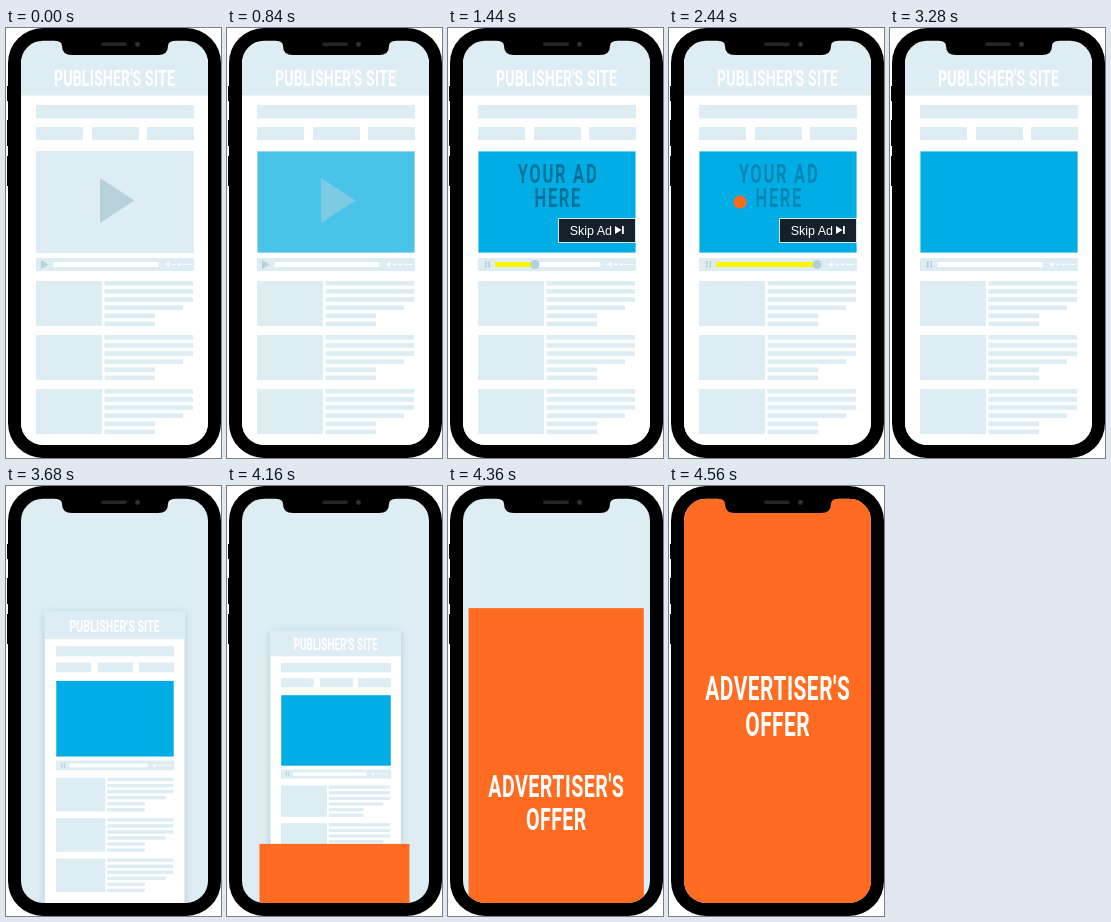
These frames come from a looping animation (215 px wide and 430 px high, 5.8 s). An HTML page:

```html
<!DOCTYPE html>
<html lang="en">
<head>
<meta charset="utf-8">
<title>Skippable video ad</title>
<style>
html, body { margin: 0; width: 100%; height: 100%; overflow: hidden; background: #fff; }
svg { display: block; width: 100%; height: 100%; }
.caps { font-family: Roboto, "Liberation Sans", sans-serif; font-weight: 700; text-anchor: middle; }
.skip { font: 12.5px "Liberation Sans", Arial, sans-serif; fill: #fff; }
</style>
</head>
<body>
<svg viewBox="0 0 215 430">
  <defs>
    <clipPath id="screen"><rect x="15" y="12.700" width="187" height="404.300" rx="22"/></clipPath>
    <filter id="blur" x="-15%" y="-15%" width="130%" height="130%"><feGaussianBlur stdDeviation="5"/></filter>
  </defs>
  <rect x="2" y="0" width="213" height="430" rx="35"/>
  <path d="M1 58h2v15h-2zM1 92h2v26h-2zM1 128h2v30h-2z"/>
  <g clip-path="url(#screen)">
    <rect x="15" y="12" width="187" height="405" fill="#deedf4"/>
    <g id="page">
      <rect id="shadow" x="15" y="33" width="187" height="392" fill="#7f9cab" opacity=".5" filter="url(#blur)"/>
      <rect x="15" y="31" width="187" height="392" fill="#fff"/>
      <g id="blocks" fill="#deedf4"></g>
      <g id="title"></g>
      <rect id="ad" x="30.500" y="123.500" width="157" height="101" fill="#00aee5"/>
      <path id="play" d="M94 150L128.500 172.500L94 195Z" fill="#b7d2db"/>
      <path id="playIcon" d="M35 232L42.500 236.500L35 241Z" fill="#b7d2db"/>
      <path id="pauseIcon" d="M37 233h1.500v7h-1.500zM40.500 233h1.500v7h-1.500z" fill="#b7cfda"/>
      <rect x="47.500" y="234" width="105" height="5" rx="1.500" fill="#fff"/>
      <path d="M159 236.500L163.500 233.500V239.500ZM166 236h4v1h-4zM172 235.500h3v2h-3zM177 236h8v1h-8z" fill="#fff" opacity=".8"/>
      <g id="overlay">
        <g id="adText"></g>
        <rect id="bar" x="47" y="234" height="5" fill="#fbf500"/>
        <circle id="knob" cy="236.500" r="4.600" fill="#b3cfda"/>
        <rect x="110.500" y="190.500" width="77" height="24" fill="#15202a" stroke="#d5e8ef"/>
        <text class="skip" x="121.700" y="206.800">Skip Ad</text>
        <path d="M167 198L173.500 202L167 206ZM174 198h1.800v8h-1.800z" fill="#fff"/>
      </g>
      <circle id="tap" cx="71" cy="174" fill="#f76a1f"/>
    </g>
    <g id="sheet">
      <rect x="15" y="13" width="187" height="530" fill="#ff6b21"/>
      <g id="offer"></g>
    </g>
  </g>
  <path d="M49 12V12.700Q56 13 56 18Q56 27 66 27H152Q162 27 162 18Q162 13 169 12.700V12Z"/>
  <rect x="95" y="14.500" width="26" height="3.500" rx="1.700" fill="#252628"/>
  <circle cx="131.500" cy="16.300" r="2.600" fill="#24262c"/>
  <circle cx="131.500" cy="16.300" r="1.100" fill="#3b414d"/>
</svg>
<script>
const LOOP = 5800, STEP = 40;
const NS = "http://www.w3.org/2000/svg";
const $ = id => document.getElementById(id);
const clamp = v => Math.max(0, Math.min(1, v));
const span = (t, a, b) => clamp((t - a) / (b - a));
const mix = (a, b, p) => a + (b - a) * p;

function add(parent, tag, attrs) {
  const el = document.createElementNS(NS, tag);
  for (const k in attrs) el.setAttribute(k, attrs[k]);
  return parent.appendChild(el);
}
function set(id, attrs) {
  for (const k in attrs) $(id).setAttribute(k, attrs[k]);
}
function show(id, on) {
  $(id).style.display = on ? "" : "none";
}
function block(x, y, width, height) {
  add($("blocks"), "rect", { x, y, width, height });
}
// Condensed poster capitals
function caps(id, str, x, y, size, fill, gap) {
  const el = add($(id), "text", {
    class: "caps", transform: `translate(${x} ${y}) scale(.625 1)`,
    "font-size": size, "letter-spacing": gap, fill
  });
  el.textContent = str;
}

block(15, 31, 187, 36.5);
block(30, 77, 158, 13.5);
[30, 86, 141].forEach(x => block(x, 99, 47, 13));
block(30, 123, 158, 102);
block(30, 230, 158, 13);
for (let row = 0; row < 3; row++) {
  const y = 253 + row * 54;
  block(30, y, 66, 45);
  [88.5, 88.5, 88.5, 78.5, 50.5, 50.5].forEach((w, i) => block(98.5, y + i * 8.1, w, 4.6));
}
caps("title", "PUBLISHER'S SITE", 108.5, 58, 22.5, "#fff", .3);
caps("adText", "YOUR AD", 110, 155.2, 26.5, "#004a6b", 2.7);
caps("adText", "HERE", 110.3, 179.3, 26.5, "#004a6b", 2.7);
caps("offer", "ADVERTISER'S", 108.7, 214, 33.5, "#fff", .8);
caps("offer", "OFFER", 108.7, 249.7, 33.5, "#fff", .8);

function render(t) {
  // Ad fades in over the player
  const fade = span(t, 400, 1000);
  set("ad", { opacity: fade ** 1.3 });
  set("play", { opacity: 1 - fade * fade });
  show("playIcon", t < 1000);
  show("pauseIcon", t >= 1000);

  // Ad playback
  show("overlay", t >= 1000 && t < 3280);
  const x = mix(60, 148, span(t, 1000, 2440));
  set("bar", { width: x - 47 });
  set("knob", { cx: x });
  set("adText", { opacity: t < 1800 ? .6 * span(t, 960, 1400) : mix(.6, .28, span(t, 1800, 2800)) });

  // Tap
  show("tap", t >= 2240 && t < 2840);
  set("tap", { r: 14 * (1 - (1 - span(t, 2200, 2800)) ** 1.25) });

  // Page shrinks towards the bottom
  const s = mix(1, .697, span(t, 3280, 3760));
  set("page", { transform: `translate(109 406.500) scale(${s}) translate(-109 -406.500)` });
  show("shadow", t > 3280);

  // Offer slides up and widens
  const rise = 1 - (1 - span(t, 4120, 4560)) ** 1.66;
  const k = mix(.768, 1, rise);
  show("sheet", t >= 4160);
  set("sheet", { transform: `translate(${mix(107.3, 108.5, rise)} ${mix(417, 13, rise)}) scale(${k}) translate(-108.500 -13)` });
}

const start = performance.now();
function tick() {
  const t = (performance.now() - start) % LOOP;
  render(Math.floor(t / STEP) * STEP);
  requestAnimationFrame(tick);
}
tick();
</script>
</body>
</html>
```
